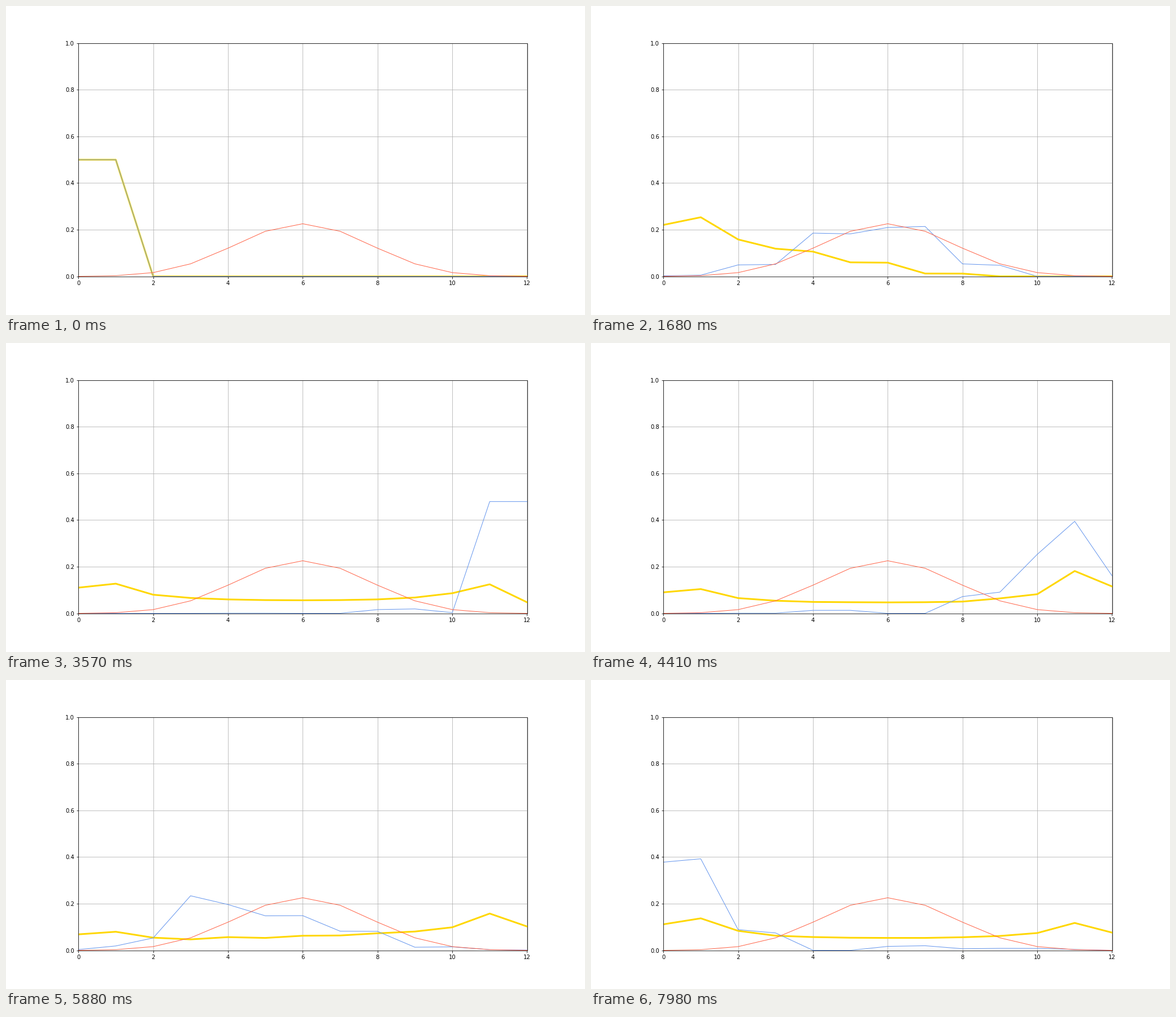
Write a matplotlib script that moves like this. It is 1025 px wide and 547 px high and loops after 8 s.

```python
import numpy as np
import matplotlib.pyplot as plt
from math import comb
from matplotlib.animation import FuncAnimation

W, H, DPI = 1025, 547, 72
N = 12                      # hypercube dimension
LOOP, TICK, STEP = 8000, 20, 210
STEPS = LOOP // STEP + 1


def walk(n, count):
    """Grover walk on the n-cube, by distance from the start corner."""
    x = np.arange(n + 1)
    c = 1 - 2 * x / n
    s = np.sqrt(1 - c ** 2)
    left, right = np.zeros(n + 1), np.zeros(n + 1)
    right[0] = 1
    probs = []
    for _ in range(count):
        probs.append(left ** 2 + right ** 2)
        out_left, out_right = s * right - c * left, s * left + c * right
        left = np.append(0, out_right[:-1])
        right = np.append(out_left[1:], 0)
    return np.array(probs)


prob = walk(N, STEPS + 1)
pair = (prob[:-1] + prob[1:]) / 2
mean = np.cumsum(prob, axis=0) / np.arange(1, STEPS + 2)[:, None]
binomial = [comb(N, k) / 2 ** N for k in range(N + 1)]

plt.rcParams.update({"font.family": "DejaVu Sans", "font.size": 10})
fig = plt.figure(figsize=(W / DPI, H / DPI), dpi=DPI, facecolor="white")
fig.subplots_adjust(left=0.125, right=0.9, bottom=0.125, top=0.88)
ax = fig.add_subplot()
ax.set(xlim=(0, N), ylim=(0, 1), xticks=range(0, N + 1, 2))
ax.grid(True)

sites = np.arange(N + 1)
mean_line, = ax.plot(sites, mean[1], color="gold", lw=3)
pair_line, = ax.plot(sites, pair[0], color="cornflowerblue", lw=1)
ax.plot(sites, binomial, color="tomato", lw=1)


def update(i):
    k = (i * TICK + TICK // 2) // STEP
    mean_line.set_ydata(mean[max(k, 1)])
    pair_line.set_ydata(pair[k])
    return mean_line, pair_line


anim = FuncAnimation(fig, update, frames=LOOP // TICK, interval=TICK,
                     repeat=True, repeat_delay=0)
plt.show()
```
